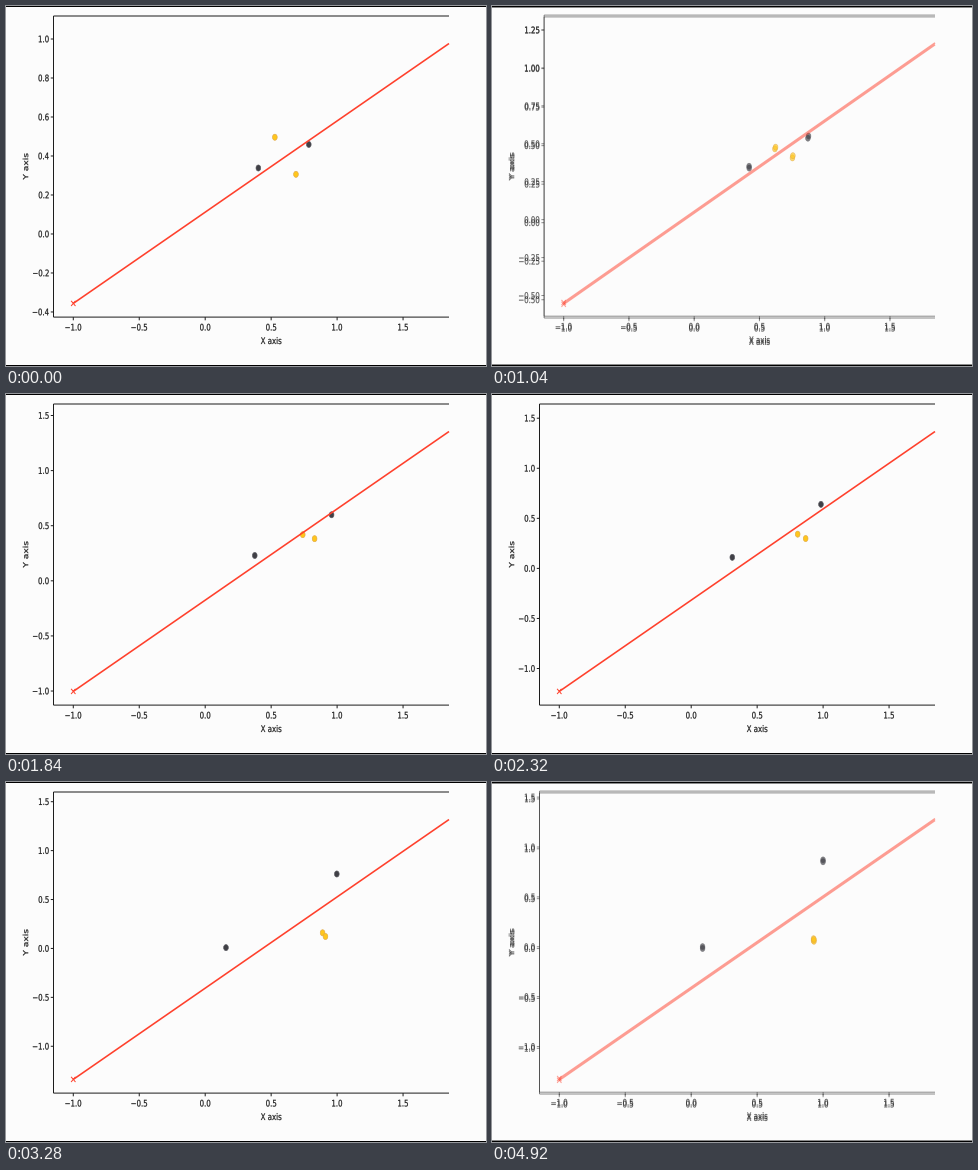
A matplotlib script for the animation above (4.96 s loop, 480 by 360 pixels).

```python
from functools import lru_cache

import numpy as np
import matplotlib.pyplot as plt
from matplotlib.animation import FuncAnimation
from matplotlib.collections import LineCollection
from matplotlib.patches import Ellipse, PathPatch, Rectangle
from matplotlib.path import Path
from matplotlib.textpath import TextPath

W, H, DPI = 480, 360, 80
PX = 72 / DPI               # one pixel in points
FRAMES, INTERVAL = 124, 40
TOP, BOTTOM, RIGHT, CROP = 10.0, 311.1, 482.8, 443
MARGIN = 1 / 22             # five percent of the data range on each side
SQUEEZE, EM = 0.77, 9.1     # the whole plot is narrowed by one factor

PAPER, INK, RED = "#fcfcfc", "#1c1c1c", "#ff402c"
DARK, GOLD = "#404046", "#ffc61c"


def sigmoid(z):
    return 1 / (1 + np.exp(-z))


def ease(t, mid, width):
    return sigmoid((t - mid) / width)


def boundary(t):
    """Heights of the separating line at x = -1 and x = 2."""
    early = 1 - np.exp(-t / 15)
    start = -0.336 - 1.045 * ease(t, 39.3, 10) + 0.06 * ease(t, 82, 4)
    end = (1.047 + 0.18 * early + 0.29 * ease(t, 32.5, 5.5)
           - 0.094 * ease(t, 78, 7))
    return start, end


def hidden_points(t):
    """Two sigmoid units applied to the inputs 00, 11, 01 and 10."""
    early, late = 1 - np.exp(-t / 15), ease(t, 71.5, 14)
    none = np.array([-0.38 + 0.17 * early - 2.21 * late,
                     -0.63 + 0.32 * early - 6.75 * late])
    first = np.array([-0.10 + 2.74 * ease(t, 52, 21), -2.5 * late])
    second = np.array([0.614 + 2.035 * ease(t, 47, 20),
                       -0.81 + 0.69 * early - 2.45 * ease(t, 67.5, 12)])
    both = first + second - none
    return sigmoid(np.array([none, both, first, second]))


@lru_cache(maxsize=None)
def glyphs(text, upright):
    path = TextPath((0, 0), text, size=EM)
    v = path.vertices
    if upright:
        v = np.column_stack([-v[:, 1], v[:, 0]])
    path = Path(v * [SQUEEZE, -1], path.codes)
    return path, path.get_extents()


def label(text, x, y, ha=0.5, upright=False):
    path, box = glyphs(text, upright)
    shift = [x - box.x0 - ha * box.width, y - (box.y0 + box.y1) / 2]
    return Path(path.vertices + shift, path.codes)


def number(value, digits):
    return f"{value + 0.0:.{digits}f}".replace("-", "\u2212")


fig = plt.figure(figsize=(W / DPI, H / DPI), dpi=DPI, facecolor=PAPER)
ax = fig.add_axes([0, 0, 1, 1])
ax.set_xlim(0, W)
ax.set_ylim(H, 0)
ax.axis("off")


def bar(row, color):
    return ax.add_patch(Rectangle((0, row), W, 1, color=color, lw=0, zorder=9))


bar(0, "black")
bar(H - 1, "black")
soft_bars = [bar(1, "#8a8a8a"), bar(H - 2, "#8a8a8a")]


class Plot:
    """One drawing of the chart; two of them overlap in blended frames."""

    def __init__(self):
        self.text = ax.add_patch(PathPatch(Path([(0, 0)]), fc=INK, ec=INK,
                                           lw=0.2 * PX, zorder=4))
        self.rules = self.strokes(INK, 1, 4)
        self.cross = self.strokes(RED, 1, 3)
        self.line, = ax.plot([], [], color=RED, lw=1.6 * PX, zorder=3,
                             solid_capstyle="butt")
        self.dots = [ax.add_patch(Ellipse((0, 0), 4.7, 6.1, fc=fc, ec=ec,
                                          lw=0.6 * PX, zorder=2))
                     for fc, ec in [(DARK, "#5a5a60")] * 2 + [(GOLD, "#e0a848")] * 2]
        self.parts = [self.text, self.rules, self.line, self.cross, *self.dots]

    @staticmethod
    def strokes(color, width, zorder):
        lines = LineCollection([], colors=color, linewidths=width * PX, zorder=zorder)
        lines.set_snap(False)
        return ax.add_collection(lines)

    def show(self, visible):
        for part in self.parts:
            part.set_visible(visible)

    def draw(self, t, dy, blended):
        t = np.clip(t, 0, FRAMES - 2)
        y0, y1 = boundary(t)
        pad = (y1 - y0) * 0.05
        low, high = y0 - pad, y1 + pad
        step = next(s for s in (0.2, 0.25, 0.5) if (high - low) / 9 <= s)
        digits = 2 if step == 0.25 else 1
        left = 47.5 + (4.6 if digits == 2 else 0)
        top, bottom = TOP + dy, BOTTOM + dy

        def px(x):
            return left + (RIGHT - left) * ((x + 1) / 3 * (1 - 2 * MARGIN) + MARGIN)

        def py(y):
            return bottom - (bottom - top) * (y - low) / (high - low)

        rules = [[(left, top), (CROP, top)], [(left, bottom), (CROP, bottom)],
                 [(left, top), (left, bottom)]]
        texts = [label("X axis", (left + RIGHT) / 2, 334.6 + dy),
                 label("Y axis", 19.5, (top + bottom) / 2, upright=True)]
        for x in np.arange(-1, 1.6, 0.5):
            rules.append([(px(x), bottom), (px(x), bottom + 3.2)])
            texts.append(label(number(x, 1), px(x), 321.2 + dy))
        for k in range(int(np.ceil(low / step)), int(np.floor(high / step)) + 1):
            y = py(k * step)
            rules.append([(left - 2.7, y), (left, y)])
            texts.append(label(number(k * step, digits), left - 4.8, y, ha=1))
        self.rules.set_segments(rules)
        self.text.set_path(Path.make_compound_path(*texts))

        x, y = px(-1), py(y0)
        end = (CROP - x) / (px(2) - x)
        self.line.set_data([x, CROP], [y, py(y0 + (y1 - y0) * end)])
        self.cross.set_segments([[(x - 2.2, y - 2.6), (x + 2.2, y + 2.6)],
                                 [(x - 2.2, y + 2.6), (x + 2.2, y - 2.6)]])
        for dot, (u, v) in zip(self.dots, hidden_points(t)):
            dot.set_center((px(u), py(v)))

        for part in self.parts:
            part.set_alpha(0.5 if blended else 1)
        if blended:
            for part in [self.text, *self.dots]:
                part.set_alpha(0.65)


plots = Plot(), Plot()


def update(i):
    step = max(i - 1, 0)
    blended = step % 3 != 0
    if blended:
        plots[0].draw(step - 0.5, 0.9, True)
        plots[1].draw(step + 0.5, -0.9, True)
    else:
        plots[0].draw(step, 0, False)
    plots[1].show(blended)
    for soft in soft_bars:
        soft.set_visible(blended)
    return []


anim = FuncAnimation(fig, update, frames=FRAMES, interval=INTERVAL,
                     init_func=lambda: update(0), repeat=True, repeat_delay=0,
                     blit=False)
plt.show()
```
